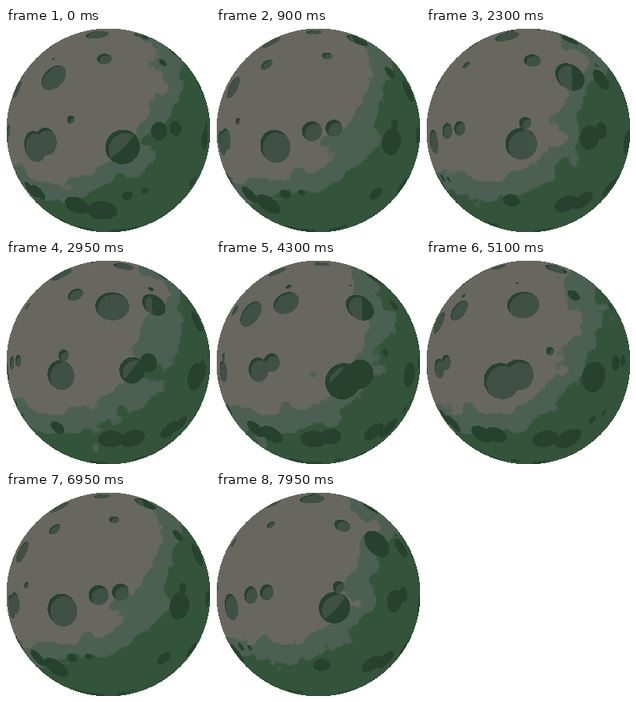
Write an HTML page with a canvas that moves like this. It is 256 px wide and 256 px high and loops after 8000 ms.

```html
<!DOCTYPE html>
<html lang="en">
<head>
<meta charset="utf-8">
<title>Cratered moon</title>
<style>
  html, body { margin: 0; width: 100%; height: 100%; overflow: hidden; background: #fff; }
  canvas { display: block; width: 100vmin; height: 100vmin; image-rendering: pixelated; }
</style>
</head>
<body>
<canvas id="moon" width="256" height="256"></canvas>
<script>
const SIZE = 256, LOOP = 8000, STEP = 50, TURN = 6000;
const LAND = 8, CRATERS = 5, LIGHT = 0.25;

const rgb = hex => 0xff000000 | (hex & 255) << 16 | (hex & 0xff00) | hex >> 16;
const ground = [0x67675f, 0x4b5f53, 0x33533a].map(rgb);
const pit = [0x3f5047, 0x26422e].map(rgb);

// Lattice shared by the terrain noise (8 x 8) and the craters (5 x 5 corner)
const lattice = [
  0, .8, .81, .82, .335, .5, .4, .6,
  .63, .9, .66, .4, .83, .6, .4, .5,
  .195, .1, 0, 0, .965, .5, .6, .3,
  .505, .81, .92, .445, .315, .35, .4, .15,
  .835, .7, .985, .22, .52, .45, .5, .6,
  .35, .3, .95, .4, .5, .4, .85, .9,
  .3, .45, .2, .2, .3, .4, .3, .35,
  .5, .45, .5, .15, .7, .8, .45, .5
];
const land = (x, y) => lattice[(y & 7) * 8 + (x & 7)];
const ease = f => f * f * (3 - 2 * f);

function noise(x, y) {
  const i = Math.floor(x), j = Math.floor(y);
  const u = ease(x - i), v = ease(y - j);
  const a = land(i, j), b = land(i + 1, j);
  const c = land(i, j + 1), d = land(i + 1, j + 1);
  const top = a + (b - a) * u;
  return top + (c + (d - c) * u - top) * v;
}

function fbm(x, y) {
  let sum = 0;
  for (let k = 0, s = 0.5; k < 4; k++, s /= 2, x *= 2, y *= 2) sum += noise(x, y) * s;
  return sum;
}

// 0 inside a cell's circle, 1 outside; bigger circles sit lower right
function circle(x, y) {
  const row = Math.floor(y);
  x += row * 0.31;
  const col = Math.floor(x);
  const h = lattice[(row % CRATERS) * 8 + col % CRATERS];
  if (!h) return 1;
  const r = h / 4, c = 0.25 + h / 2;
  const m = Math.hypot(x - col - c, y - row - c);
  return ease(Math.min(1, Math.max(0, (m - 0.9 * r) / (0.1 * r))));
}
const crater = (x, y) => 1 - circle(x + 11, y + 11) * circle(x + 12, y + 12);

// Everything about a pixel that does not depend on time
const pixels = [];
for (let py = 0; py < SIZE; py++) {
  for (let px = 0; px < SIZE; px++) {
    const x = px / SIZE, y = py / SIZE;
    if (Math.hypot(x - 0.5, y - 0.5) > 0.49999) continue;
    const cx = 2 * x - 1, cy = 2 * y - 1;
    const k = 1 + Math.sqrt(Math.max(0, 1 - cx * cx - cy * cy));
    const warp = fbm(x, y);
    pixels.push({
      at: py * SIZE + px,
      light: Math.hypot(x - LIGHT, y - LIGHT),
      even: (px + py) % 2 === 0,
      lx: x * LAND + warp, ly: y * LAND + warp,
      sx: (cx / k + 1) / 2 * CRATERS, sy: (cy / k + 1) / 2 * CRATERS
    });
  }
}

const ctx = document.getElementById("moon").getContext("2d");
const image = ctx.createImageData(SIZE, SIZE);
const out = new Uint32Array(image.data.buffer);
const shade = (LIGHT - 0.5) * 0.03 * CRATERS;

function groundColor(p, turn) {
  const d = p.light + fbm(p.lx + turn * LAND, p.ly) * 0.3;
  const past = border => d > border && !(p.even && d < border + 2 / SIZE);
  return ground[past(0.729) ? 2 : past(0.615) ? 1 : 0];
}

function draw(time) {
  const turn = time / TURN;
  for (const p of pixels) {
    const x = p.sx + turn * CRATERS;
    const depth = crater(x, p.sy);
    if (depth < 0.5) {
      out[p.at] = groundColor(p, turn);
    } else {
      const dark = p.light > 0.465 ||
        crater(x + shade, p.sy + shade) < depth - (0.5 - p.light) * 2;
      out[p.at] = pit[dark ? 1 : 0];
    }
  }
  ctx.putImageData(image, 0, 0);
}

const start = performance.now();
let shown = -1;
function tick() {
  const step = Math.floor(((performance.now() - start + 1) % LOOP) / STEP);
  if (step !== shown) draw((shown = step) * STEP);
  requestAnimationFrame(tick);
}
tick();
</script>
</body>
</html>
```
